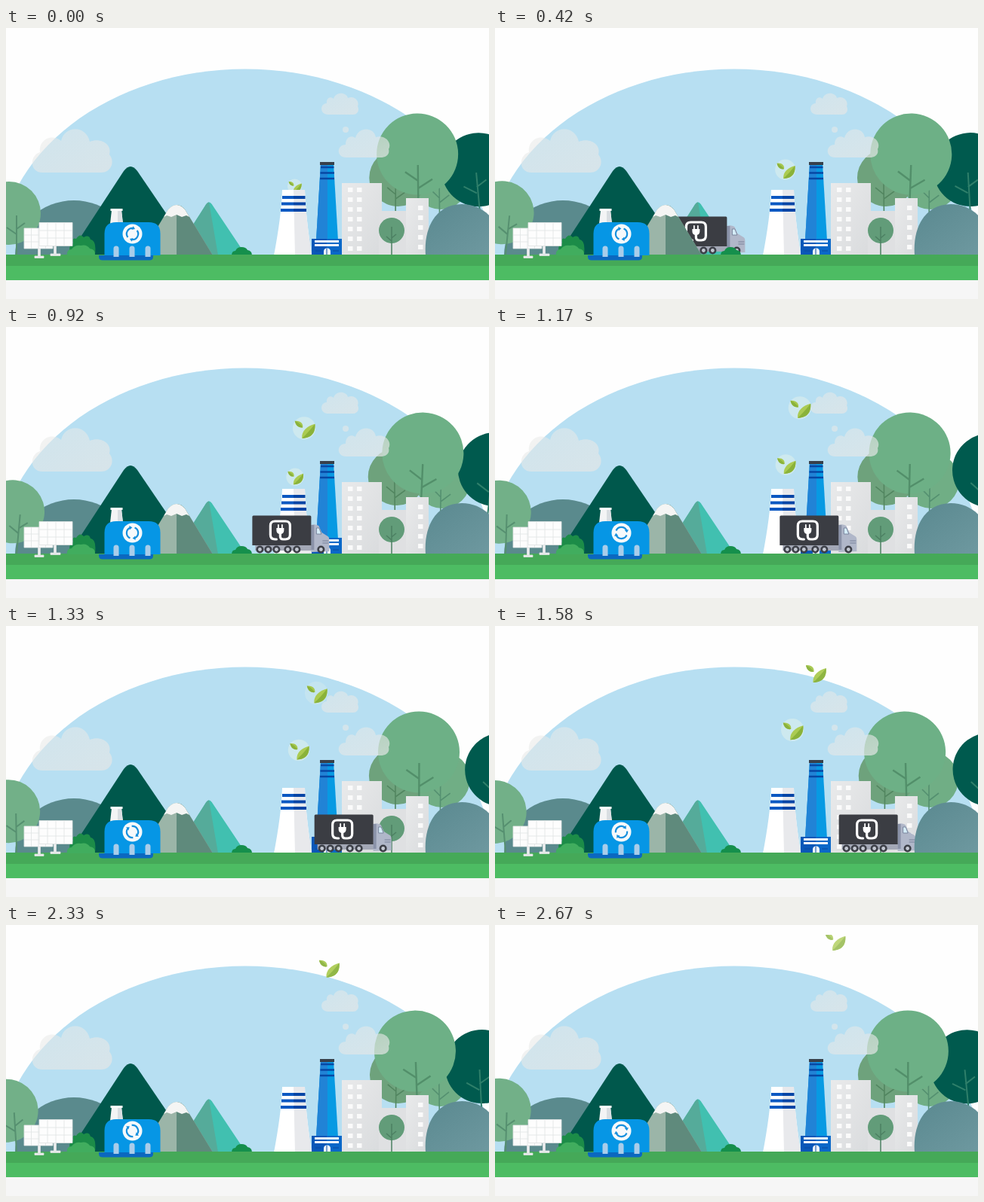
Write an HTML page that moves like this. It is 640 by 360 pixels and loops after 2.76 s.

```html
<!DOCTYPE html>
<html lang="en">
<head>
<meta charset="utf-8">
<title>Green energy landscape</title>
<style>
html, body { margin: 0; width: 100%; height: 100%; overflow: hidden; background: #fefefe; }
svg { display: block; width: 100vw; height: 100vh; }
.bubble { opacity: var(--bubble); }
</style>
</head>
<body>
<svg id="stage" viewBox="0 0 640 360" xmlns="http://www.w3.org/2000/svg">
  <defs>
    <linearGradient id="cloudFill" x1="0" y1="0" x2="1" y2="1">
      <stop offset="0" stop-color="#e9eae8" stop-opacity=".48"/>
      <stop offset="1" stop-color="#e4e6e6" stop-opacity=".72"/>
    </linearGradient>
    <linearGradient id="wall" x1="0" y1="0" x2="1" y2="1">
      <stop offset="0" stop-color="#e9eaeb"/>
      <stop offset="1" stop-color="#d9dbdd"/>
    </linearGradient>
    <linearGradient id="hill" x1="0" y1="0" x2="1" y2="1">
      <stop offset="0" stop-color="#5a8990"/>
      <stop offset="1" stop-color="#709aa1"/>
    </linearGradient>
    <clipPath id="air"><path d="M340 13H640V216H340Z"/></clipPath>
    <g id="leaf">
      <circle class="bubble" r="16" fill="#e4f3ec"/>
      <path d="M-13-10C-6-11-1-7-2-1C-8 0-12-4-13-10Z" fill="#a6c84e"/>
      <path d="M-13-10Q-6-7-2-1C-8 0-12-4-13-10Z" fill="#8ab23c"/>
      <path d="M15-6C16 4 12 14-3 14C-4 4 4-3 15-6Z" fill="#abcb52"/>
      <path d="M15-6C16 4 12 14-3 14Q6 6 15-6Z" fill="#8ab23a"/>
    </g>
  </defs>

  <rect width="640" height="360" fill="#fefefe"/>
  <ellipse cx="317" cy="306" rx="326" ry="251.500" fill="#b7dff2"/>
  <ellipse cx="90" cy="302" rx="78" ry="73" fill="#5a8a8d"/>

  <g id="leftTree">
    <circle cx="4" cy="246" r="42" fill="#72b088"/>
    <path d="M14 301V249M14 274L1 265M14 267L25 259" fill="none" stroke="#569070" stroke-width="2"/>
  </g>

  <g id="thirdTree">
    <circle cx="577" cy="204" r="37" fill="#70ae85"/>
    <path d="M575 300V206M575 226L566 217M575 232L588 222" fill="none" stroke="#549070" stroke-width="1.6"/>
  </g>
  <g id="darkTree">
    <circle cx="641.5" cy="188.5" r="49" fill="#005a4e"/>
    <path d="M633 300L638 192M635 219L619 208M636 211L650 203" fill="none" stroke="#2f7f6a" stroke-width="2"/>
  </g>
  <g id="backTree">
    <circle cx="519" cy="199" r="38" fill="#6ea27c"/>
    <path d="M516 300V205M516 221L505 212M516 227L530 217" fill="none" stroke="#528660" stroke-width="1.6"/>
  </g>
  <g id="bigTree">
    <circle cx="546.5" cy="167.5" r="54" fill="#6db086"/>
    <path d="M547 300V182M547 203L530 191M547 213L566 201" fill="none" stroke="#528f6a" stroke-width="2.4"/>
  </g>

  <g id="clouds" fill="url(#cloudFill)">
    <path d="M48 192C31 192 31 169 45 165C43 147 62 140 73 150C78 129 106 129 111 151C126 145 141 155 137 168C145 178 139 192 126 192Z"/>
    <path d="M427 115C415 115 416 100 425 100C424 93 430 90 434 94C437 84 451 85 453 93C462 89 469 98 466 104C469 110 465 115 460 115Z"/>
    <path d="M451 172C437 172 438 155 450 155C450 145 457 142 463 146C467 131 487 131 490 145C502 141 512 152 507 161C509 168 503 172 496 172Z"/>
    <circle cx="450" cy="135" r="4"/>
  </g>

  <path d="M222 302L264 236Q269 227 274 236L318 302Z" fill="#41c0b0"/>
  <path d="M222 302L264 236Q266.500 231.500 269 231.500L281 302Z" fill="#55ab9a"/>

  <g id="city">
    <path d="M445 206H498V302H445Z" fill="url(#wall)"/>
    <path d="M494 243H531V302H494Z" fill="#dfe0e2"/>
    <path d="M530 226H560V302H530Z" fill="url(#wall)"/>
    <g id="panes" fill="#fafafa"></g>
  </g>

  <circle cx="511" cy="269" r="17" fill="#629c79"/>
  <path d="M511 301V264M511 283L504 277M511 279L517 274" stroke="#4c8062" stroke-width="1.5" fill="none"/>

  <g id="leaves" clip-path="url(#air)">
    <use id="leafA" href="#leaf"/>
    <use id="leafB" href="#leaf"/>
  </g>

  <g id="cooling">
    <path d="M366 215H396C397 245 401 275 405 302H355C360 275 365 245 366 215Z" fill="#fff"/>
    <path d="M381 215H396C397 245 401 275 405 302H383Z" fill="#e8e9ec"/>
    <path d="M366 223H381V227H366ZM365 231.500H381V235.500H365ZM364 240H381V244H364Z" fill="#0b58c2"/>
    <path d="M381 223H396.500V227H381ZM381 231.500H397V235.500H381ZM381 240H398V244H381Z" fill="#0745a6"/>
  </g>

  <g id="chimney">
    <path d="M417 180H434L440 282H411Z" fill="#079ae3"/>
    <path d="M417 180H426V282H411Z" fill="#2183d6"/>
    <path d="M416 178H435V182H416Z" fill="#38404a"/>
    <path d="M417 185H434.500M416.500 192.500H435M416 200H435" stroke="#0748a4" stroke-width="2.4"/>
    <path d="M405 280H445V302H405Z" fill="#0a57b8"/>
    <path d="M425 280H445V302H425Z" fill="#0a68c8"/>
    <path d="M409 282H441V285H409ZM409 287H441V290H409Z" fill="#f3f7fc"/>
    <path d="M421 302V297Q421 292.500 425.500 292.500Q430 292.500 430 297V302Z" fill="#eef3fa"/>
    <path d="M425 302V293M410 296H418M433 296H441" stroke="#0a4b9f" stroke-width="1"/>
  </g>

  <g id="truck">
    <path d="M4 289H98V297H4Z" fill="#a3a8b6"/>
    <path d="M78 299V263Q83 261 88 264L92 273L100 278Q102 279 102 283V298Z" fill="#b0b7c9"/>
    <path d="M78 263H82V296H78Z" fill="#8a92a8"/>
    <path d="M85 267H88.500L91.500 275H85Z" fill="#d5ecf7" stroke="#69748e" stroke-width=".8"/>
    <path d="M93 284H101M93 287H101" stroke="#78829a"/>
    <path d="M0 252Q0 250.500 1.500 250.500H76.500Q78 250.500 78 252V290H0Z" fill="#3b3d43"/>
    <g transform="translate(37 270)" fill="none" stroke="#fff" stroke-linecap="round">
      <path d="M-5 12H-7Q-13 12-13 6V-6Q-13-12-7-12H7Q13-12 13-6V6Q13 12 7 12H4Q0 12 0 8V4" stroke-width="3.2"/>
      <path d="M-2.500-7V-3M2.500-7V-3" stroke-width="1.8"/>
      <path d="M-5-3H5V0Q5 5 0 5Q-5 5-5 0Z" fill="#fff" stroke="none"/>
    </g>
    <g id="wheels"></g>
  </g>

  <path d="M83 302L156 190Q165 178 174 190L250 302Z" fill="#00584c"/>
  <path d="M178 302L215 241Q226 229 237 241L274 302Z" fill="#9bb5a8"/>
  <path d="M226 235Q232 235 237 241L274 302H226Z" fill="#5f8a7c"/>
  <path d="M209 251L215 241Q226 229 237 241L243 251L239 249L233 251L226 248L219 251L213 249Z" fill="#f5f5f4"/>

  <path d="M299 302Q299 296 304 296Q306 291 312 291Q318 291 320 295Q326 296 326 302Z" fill="#158f4c"/>
  <path d="M556 302C553 262 572 234 604 234C636 234 660 262 660 302Z" fill="url(#hill)"/>

  <path d="M0 301H640V316H0Z" fill="#45a958"/>
  <path d="M0 316H640V335H0Z" fill="#4dbc63"/>
  <path d="M0 335H640V360H0Z" fill="#f6f6f6"/>

  <path d="M85 301Q82 288 89 286Q87 278 93 280Q98 272 103 278Q110 274 112 281Q120 282 118 301Z" fill="#1c8c48"/>
  <path d="M81 302Q80 294 87 294Q91 288 99 289Q107 287 111 293Q119 294 118 302Z" fill="#41ad5e"/>

  <g id="solar" stroke="#dfe2e3" stroke-width=".8">
    <path d="M42.500 293H45.500V304H42.500ZM38 303H50V305.500H38Z" fill="#eceeef"/>
    <path d="M24 266H62V293H24Z" fill="#fcfcfc"/>
    <path d="M33.500 266V293M43 266V293M52.500 266V293M24 275H62M24 284H62"/>
    <path d="M63.500 289H66.500V301H63.500ZM59 300H72V302.500H59Z" fill="#eceeef"/>
    <path d="M44 258.500H88V289.500H44Z" fill="#fdfdfd"/>
    <path d="M55 258.500V289.500M66 258.500V289.500M77 258.500V289.500M44 269H88M44 279H88"/>
  </g>

  <g id="plant">
    <path d="M140 242H153L155 260H138Z" fill="#f3f4f5"/>
    <path d="M148 242H153L155 260H148Z" fill="#d9dee2"/>
    <path d="M138.500 240H154.500V243H138.500Z" fill="#fff"/>
    <path d="M123 302H195V304Q195 308.500 190 308.500H128Q123 308.500 123 304Z" fill="#0b68c0"/>
    <path d="M130.500 302V273Q130.500 258 146 258H189Q204.500 258 204.500 273V302Z" fill="#0696e5"/>
    <g id="posts" fill="#a9cdea"></g>
    <circle cx="167.500" cy="273.500" r="13" fill="#f6f9fb"/>
    <g id="ring" fill="none" stroke="#1690de" stroke-width="2.200">
      <path d="M6.900 3.200A7.600 7.600 0 0 1-6.900 3.200M-6.900-3.200A7.600 7.600 0 0 1 6.900-3.200"/>
      <path d="M-9.600 4L-7.300 0L-4.200 3.600ZM9.600-4L7.300 0L4.200-3.600Z" fill="#1690de" stroke="none"/>
    </g>
  </g>
</svg>
<script>
const LOOP = 2760, STEP = 1000 / 12, STEPS = 33;
const $ = id => document.getElementById(id);
const place = (id, value) => $(id).setAttribute('transform', value);

// linear interpolation through [time, value] points
function along(points, t) {
  let i = 1;
  while (i < points.length - 1 && t > points[i][0]) i++;
  const [t0, a] = points[i - 1], [t1, b] = points[i];
  return a + (b - a) * (t - t0) / (t1 - t0);
}

const truckX = [[0, 148], [420, 230], [920, 327], [1170, 378], [1580, 455], [2000, 538], [2670, 670]];
const leafY = [[0, 210], [220, 199], [420, 188], [920, 134], [1170, 107], [1580, 62], [2000, 17], [2500, -36]];
const leafSize = [[0, .6], [420, .85], [920, .95], [2760, .95]];

const panes = [];
for (let y = 212; y < 294; y += 13) panes.push([453, y], [465, y]);
for (let y = 236; y < 294; y += 13) panes.push([546, y]);
$('panes').innerHTML = panes.map(([x, y]) =>
  `<rect x="${x}" y="${y}" width="6.5" height="6"/>`).join('');

$('wheels').innerHTML = [10, 21, 32, 47, 59, 91].map(x =>
  `<circle cx="${x}" cy="295.5" r="5" fill="#3c3f47"/><circle cx="${x}" cy="295.5" r="2.4" fill="#c3c8d2"/>`).join('');

$('posts').innerHTML = [146, 167, 188].map(x =>
  `<path d="M${x - 3.5} 304V293Q${x - 3.5} 289.5 ${x} 289.5Q${x + 3.5} 289.5 ${x + 3.5} 293V304Z"/>`).join('');

function sway(id, x, y, degrees, start, t) {
  const angle = degrees * Math.sin(2 * Math.PI * (t - start) / 2560);
  place(id, `rotate(${angle} ${x} ${y})`);
}

function drift(id, age) {
  const style = $(id).style;
  style.display = age < 0 ? 'none' : '';
  if (age < 0) return;
  const x = 382.5 + 70 * (age / 2000) ** 2.2;
  place(id, `translate(${x} ${along(leafY, age)}) scale(${along(leafSize, age)})`);
  style.opacity = Math.min(1, 1 - (age - 1500) / 2000);
  style.setProperty('--bubble', Math.max(0, Math.min(.5, (1600 - age) / 900)));
}

function draw(t) {
  sway('leftTree', 14, 301, 6.7, 0, t);
  sway('bigTree', 547, 300, 2.85, 85, t);
  sway('darkTree', 632, 300, 8.2, 750, t);
  sway('backTree', 516, 300, .8, 1360, t);
  sway('thirdTree', 575, 300, .8, 300, t);
  place('truck', `translate(${along(truckX, t)} 0)`);
  place('ring', `translate(167.5 273.5) rotate(${90 + .36 * (t - 420)})`);
  drift('leafA', t);
  drift('leafB', t - 700);
}

// the picture advances at twelve steps a second
const begin = performance.now();
function tick(now) {
  const t = Math.max(0, now - begin) % LOOP;
  draw(Math.min(STEPS - 1, Math.floor((t + 4) / STEP)) * STEP);
  requestAnimationFrame(tick);
}
draw(0);
requestAnimationFrame(tick);
</script>
</body>
</html>
```
